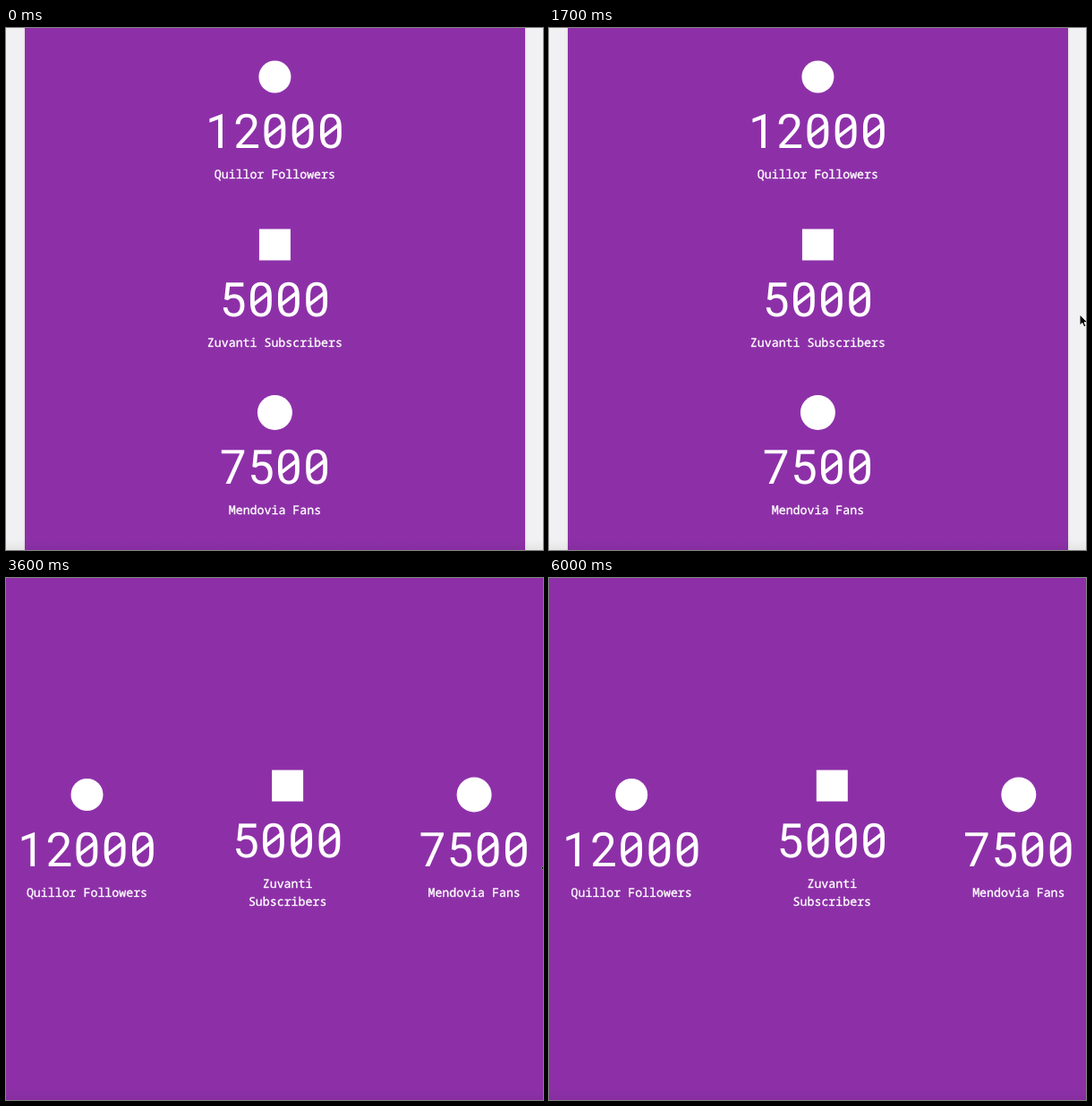
These frames come from a looping animation (600 px wide and 583 px high, 6700 ms). An HTML page:

```html
<!DOCTYPE html>
<html lang="en">
<head>
<meta charset="utf-8">
<title>Follower counters</title>
<style>
  html, body { margin: 0; width: 100%; height: 100%; overflow: hidden; background: #f1f0f2; }
  svg { display: block; width: 600px; height: 583px; text-rendering: geometricPrecision; }
  text { fill: #fff; text-anchor: middle; }
  .count { font: 400 53px Roboto, sans-serif; }
  .label { font: 500 13.25px "Noto Sans Mono", monospace; stroke: #fff; stroke-width: .35; }
  .slash { fill: none; stroke: #fff; stroke-width: 4; }
</style>
</head>
<body>
<svg id="stage" viewBox="0 0 600 583">
  <defs>
    <linearGradient id="foot" x2="0" y2="1">
      <stop offset="0" stop-opacity="0"/>
      <stop offset="1" stop-opacity=".05"/>
    </linearGradient>
  </defs>
  <rect id="shade" y="-5" height="593" fill="#000" fill-opacity=".035"/>
  <rect id="page" y="-5" height="593" fill="#8d30a8"/>
  <rect y="571" width="600" height="12" fill="url(#foot)"/>
  <g id="items"></g>
  <path id="arrow" d="M0 0V12.2L2.9 9.6L4.8 14L7 13L5.1 8.8H8.8Z"
        fill="#000" stroke="#fff" stroke-width="1" stroke-linejoin="round"/>
  <path id="resize" d="M-7 0L-3 -4V-1.2H-1.3V-6H1.3V-1.2H3V-4L7 0L3 4V1.2H1.3V6H-1.3V1.2H-3V4Z"
        fill="#000" stroke="#fff" stroke-width="1" paint-order="stroke"/>
</svg>
<script>
const LOOP = 6700, STEP = 100, PITCH = 31.2, SPACING = 187.5;
const $ = id => document.getElementById(id);

function add(parent, tag, attrs) {
  const el = document.createElementNS("http://www.w3.org/2000/svg", tag);
  set(el, attrs);
  parent.append(el);
  return el;
}
function set(el, attrs) {
  for (const k in attrs) el.setAttribute(k, attrs[k]);
}

// Each item is drawn around its icon's centre.
const items = [
  { goal: 12000, words: ["Quillor", "Followers"], icon: ["circle", { r: 18 }] },
  { goal: 5000, words: ["Zuvanti", "Subscribers"], icon: ["rect", { x: -17.5, y: -17.5, width: 35, height: 35 }] },
  { goal: 7500, words: ["Mendovia", "Fans"], icon: ["circle", { r: 19.5 }] }
].map(item => {
  const g = add($("items"), "g", {});
  add(g, item.icon[0], { ...item.icon[1], fill: "#fff" });
  return {
    ...item, g,
    count: add(g, "text", { class: "count", y: 79.5 }),
    slash: add(g, "path", { class: "slash" }),
    lines: [0, 1].map(i => add(g, "text", { class: "label", y: 113.5 + 20 * i }))
  };
});

// Counters rise by a 200th of their goal about every 5 ms.
function countAt(i, t) {
  const { goal } = items[i];
  let n = 200;
  if (t >= 4700) n = (i ? 3.4 : 4) + (t - 4700) * 0.2015;
  else if (t >= 500) n = 1 + (t - 500) * 0.2015;
  return Math.min(goal, Math.floor(n) * Math.ceil(goal / 200));
}

function layout(t, digits) {
  if (t < 3200) {
    return [0, 1, 2].map(i => ({ x: 300.4, y: 54.5 + SPACING * i, wrap: false }));
  }
  const tight = digits[0] === 4 && digits[1] === 4;
  const xs = tight ? [85, 300.3, 516] : [92.2, 316.3, 524.8];
  const shift = t < 3700 ? -1.7 : 0;
  const wraps = [tight, digits[1] === 4, false];
  return xs.map((x, i) => ({ x: x + shift, y: 242 - (wraps[i] ? 10 : 0), wrap: wraps[i] }));
}

function drawItem(item, value, { x, y, wrap }) {
  const digits = [...String(value)];
  const xs = digits.map((d, i) => (i - (digits.length - 1) / 2) * PITCH);
  set(item.g, { transform: `translate(${x} ${y})` });
  set(item.count, { x: xs.join(" ") });
  item.count.textContent = value;
  set(item.slash, {
    d: digits.map((d, i) => d === "0" ? `M${xs[i] - 9} 67.5L${xs[i] + 9} 53.5` : "").join("")
  });
  item.lines[0].textContent = wrap ? item.words[0] : item.words.join(" ");
  item.lines[1].textContent = wrap ? item.words[1] : "";
}

// Time, x, y of the pointer
const path = [
  [1000, 580, 288], [1100, 586, 299], [1300, 591, 309], [1600, 594, 318],
  [1800, 592, 322], [2100, 583, 320], [2300, 579, 324], [2400, 578, 324], [2900, 578, 324]
];
function pointerAt(t) {
  const i = path.findIndex(p => p[0] > t);
  if (i < 1) return path[path.length - 1];
  const [a, b] = [path[i - 1], path[i]];
  const k = (t - a[0]) / (b[0] - a[0]);
  return a.map((v, j) => v + (b[j] - v) * k);
}

function draw(t) {
  const grow = Math.max(0, Math.min(1, (t - 2900) / 700)) * 27;
  const left = 21 - grow, width = 559 + 2 * grow;
  set($("page"), { x: left, width });
  set($("shade"), { x: left - 2, width: width + 4 });

  const values = items.map((item, i) => countAt(i, t));
  const places = layout(t, values.map(v => String(v).length));
  items.forEach((item, i) => drawItem(item, values[i], places[i]));

  const [, x, y] = pointerAt(t);
  const dragging = t >= 2300;
  set($("arrow"), {
    transform: `translate(${x} ${y})`,
    visibility: t >= 1000 && !dragging ? "visible" : "hidden"
  });
  set($("resize"), {
    transform: `translate(${x + grow} ${y})`,
    visibility: dragging && t < 3700 ? "visible" : "hidden"
  });
}

const start = performance.now();
let last = -1;
function tick() {
  const t = Math.floor((performance.now() - start) % LOOP / STEP) * STEP;
  if (t !== last) draw(last = t);
  requestAnimationFrame(tick);
}
tick();
</script>
</body>
</html>
```
